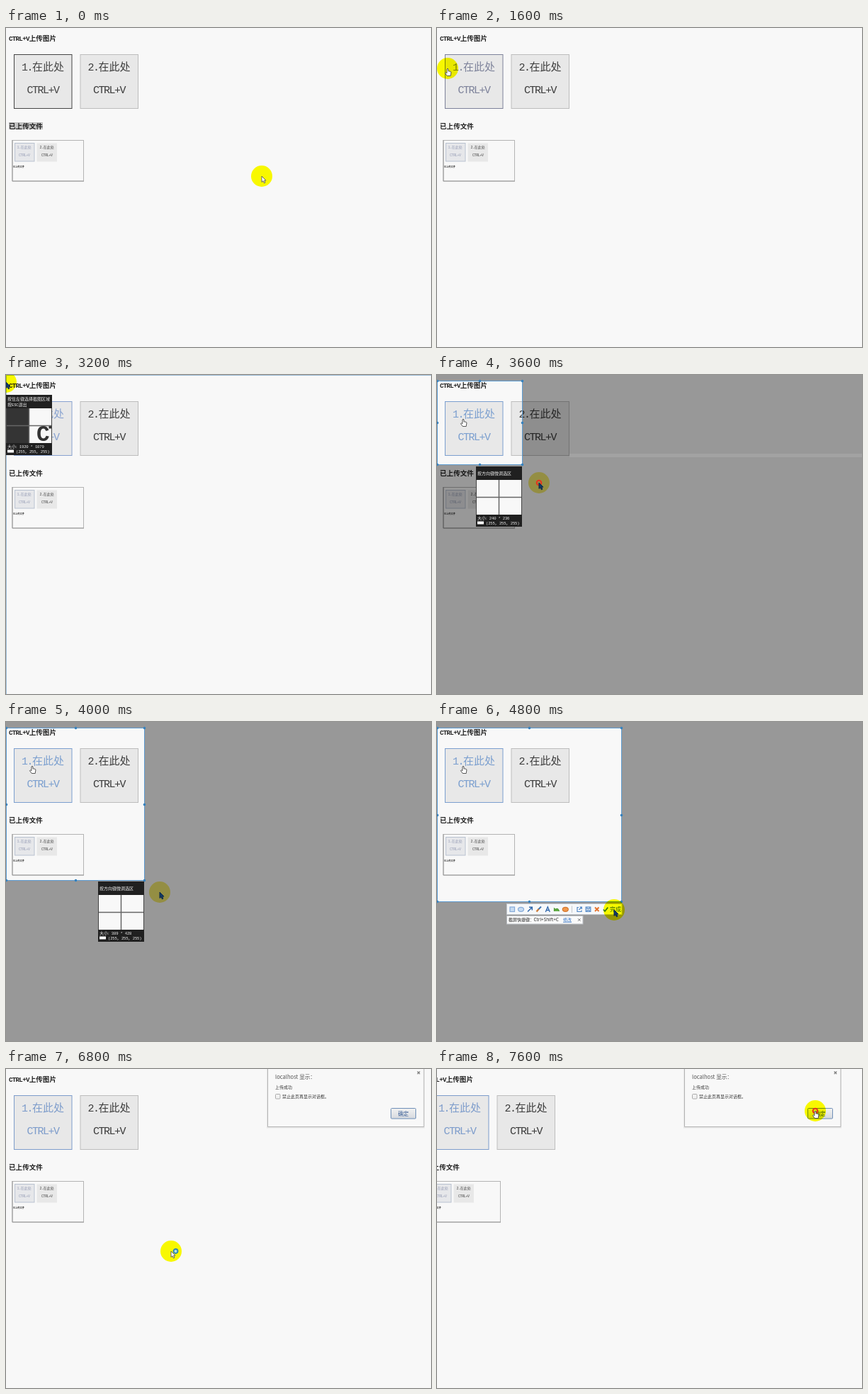
Animation, 600 px wide and 450 px high, one loop 8000 ms. Source, as an HTML page:

```html
<!DOCTYPE html>
<html lang="zh">
<head>
<meta charset="utf-8">
<title>CTRL+V 上传图片</title>
<style>
html, body { margin: 0; width: 100%; height: 100%; overflow: hidden; background: #f8f8f8; }
#stage { position: absolute; left: 0; top: 0; width: 600px; height: 450px; overflow: hidden; background: #f8f8f8; }
#stage > svg { position: absolute; left: 0; top: 0; }
text { font-family: "Noto Sans CJK SC", "Noto Sans CJK", sans-serif; white-space: pre; }
.latin { font-family: "Liberation Mono", monospace; }
.big { font-size: 15px; }
.big .latin, .big.latin { letter-spacing: -1.5px; }
.head { font-size: 9.57px; font-weight: bold; fill: #222; }
.head .latin { font-size: 9.2px; letter-spacing: -.73px; }
.mini { font-size: 5px; }
.mini .latin, .mini.latin { letter-spacing: -.4px; }
.small { font-size: 6px; }
.lens-text { font-size: 6px; fill: #eee; }
.lens-text .latin { font-size: 5.6px; letter-spacing: -.2px; }

/* Everything changes in hard steps; 5% is 400 ms. */
.step { animation: 8s step-end infinite; }
.pan { animation-name: pan; }
.marked { animation-name: marked; }
.box1 { animation-name: ink; }
.box1 rect { stroke: currentColor; }
.box1 text { fill: currentColor; }
.capture { animation-name: capture; }
.pick { animation-name: pick; }
.edge { animation-name: edge; }
.drag { animation-name: drag; }
.drag1 { animation-name: drag1; }
.drag2 { animation-name: drag2; }
.lens { animation-name: lens, lens-move; }
.tools { animation-name: tools; }
.dialog { animation-name: dialog; }
.pointer { animation-name: move; }
.plain { animation-name: plain; }
.hand { animation-name: hand; }
.navy { animation-name: navy; }
.busy { animation-name: busy; }
.click { animation-name: click; }

@keyframes pan { 0% { transform: none } 95%, 100% { transform: translateX(-20px) } }
@keyframes marked { 0% { opacity: 1 } 15%, 100% { opacity: 0 } }
@keyframes ink {
  0% { color: #454545 } 20% { color: #7d829a } 25% { color: #8a9cc4 } 40% { color: #88a2d0 }
  45% { color: #7b9fcf } 65% { color: #627388 } 70% { color: #6d83a8 } 75%, 100% { color: #7d9ccb }
}
@keyframes capture { 0%, 65% { opacity: 0 } 35% { opacity: 1 } }
@keyframes pick { 0%, 45% { opacity: 0 } 35% { opacity: 1 } }
@keyframes edge { 0%, 45% { opacity: 0 } 40% { opacity: 1 } }
@keyframes drag { 0%, 55% { opacity: 0 } 45% { opacity: 1 } }
@keyframes drag1 { 0%, 50% { opacity: 0 } 45% { opacity: 1 } }
@keyframes drag2 { 0%, 55% { opacity: 0 } 50% { opacity: 1 } }
@keyframes lens { 0%, 55% { opacity: 0 } 35% { opacity: 1 } }
@keyframes lens-move {
  0% { transform: translate(104px, 94px) } 40% { transform: translate(0, 28px) }
  45% { transform: translate(55px, 129px) } 50%, 100% { transform: translate(130px, 225px) }
}
@keyframes tools { 0%, 65% { opacity: 0 } 55% { opacity: 1 } }
@keyframes dialog { 0% { opacity: 0 } 85%, 100% { opacity: 1 } }
@keyframes move {
  0% { transform: translate(361px, 209px) } 10% { transform: translate(354px, 206px) }
  15% { transform: translate(157px, 125px) } 20% { transform: translate(15px, 57px) }
  25% { transform: translate(37px, 62px) } 35% { transform: translate(104px, 76px) }
  40% { transform: translate(0, 10px) } 45% { transform: translate(144px, 152px) }
  50% { transform: translate(217px, 240px) } 55% { transform: translate(262px, 255px) }
  60% { transform: translate(250px, 265px) } 65% { transform: translate(165.5px, 198px) }
  70% { transform: translate(233px, 257px) } 90% { transform: translate(554px, 60px) }
  95%, 100% { transform: translate(534px, 59px) }
}
@keyframes glow { 0%, 60% { background: #ff0 } 45% { background: #f8ee70 } }
@keyframes plain { 0%, 65% { opacity: 1 } 20%, 90%, 100% { opacity: 0 } }
@keyframes hand { 0%, 35% { opacity: 0 } 20%, 90%, 100% { opacity: 1 } }
@keyframes navy { 0%, 65% { opacity: 0 } 35% { opacity: 1 } }
@keyframes busy { 0%, 90% { opacity: 0 } 65% { opacity: 1 } }
@keyframes click { 0%, 50% { opacity: 0 } 45%, 95%, 100% { opacity: 1 } }

#area {
  position: absolute; left: 0; top: 8px; box-sizing: border-box; border: 1px solid #5c9bd1;
  box-shadow: 0 0 0 999px rgba(0, 0, 0, .387); animation-name: area;
}
#area::before {
  --d: radial-gradient(circle, #3a83bd 1.7px, transparent 2.1px);
  content: ""; position: absolute; inset: -3px;
  background: var(--d) 0 0, var(--d) 50% 0, var(--d) 100% 0, var(--d) 0 50%,
    var(--d) 100% 50%, var(--d) 0 100%, var(--d) 50% 100%, var(--d) 100% 100%;
  background-size: 5px 5px; background-repeat: no-repeat;
}
@keyframes area {
  0%, 65% { opacity: 0; width: 121px; height: 119px }
  45% { opacity: 1; width: 121px; height: 119px }
  50% { opacity: 1; width: 196px; height: 216px }
  55% { opacity: 1; width: 261px; height: 246px }
}
#halo {
  position: absolute; left: -15px; top: -15px; width: 30px; height: 30px; border-radius: 50%;
  background: #ff0; mix-blend-mode: multiply; animation-name: move, glow;
}
</style>
</head>
<body>
<div id="stage">
  <svg width="600" height="450">
    <defs>
      <path id="arrow" d="M0 0V8.4L2 6.7 3.4 9.8 4.9 9.1 3.5 6.1H6Z"/>
      <path id="finger" d="M-1 1Q0-.8 1 1V3.8L4 4.3Q5 4.6 4.9 6L4.2 10.5H-.7L-3.6 6.6Q-3.3 5-1 6.6Z"
        fill="#fff" stroke="#444" stroke-width=".9"/>
      <linearGradient id="face" x2="0" y2="1">
        <stop stop-color="#f2f2f2"/><stop offset="1" stop-color="#d6d9de"/>
      </linearGradient>
    </defs>
    <g class="step pan">
      <text class="head" x="4" y="18.4"><tspan class="latin">CTRL+V</tspan>上传图片</text>
      <g class="step box1">
        <rect x="11.5" y="37.5" width="81.5" height="76" fill="#e8e8e8"/>
        <text class="big" x="22" y="59.5"><tspan class="latin">1.</tspan>在此处</text>
        <text class="big latin" x="29.5" y="92">CTRL+V</text>
      </g>
      <g fill="#3c3c3c">
        <rect x="105" y="37.5" width="81.5" height="76" fill="#e8e8e8" stroke="#bdbdbd"/>
        <text class="big" x="115.5" y="59.5"><tspan class="latin">2.</tspan>在此处</text>
        <text class="big latin" x="123" y="92">CTRL+V</text>
      </g>
      <rect class="step marked" x="4" y="133" width="48" height="10" fill="#c1c1c1"/>
      <text class="head" x="4" y="141.7">已上传文件</text>

      <rect x="9" y="158.5" width="100.5" height="57.5" fill="#f8f8f8" stroke="#b4b4b4"/>
      <path d="M9 158V216H110" fill="none" stroke="#999"/>
      <rect x="12.5" y="162.5" width="27.500" height="25.5" fill="#e6e7ea" stroke="#b9c2d0"/>
      <rect x="43.500" y="162.500" width="28.500" height="26" fill="#e8e8e8"/>
      <g fill="#969db5">
        <text class="mini" x="15.5" y="170"><tspan class="latin">1.</tspan>在此处</text>
        <text class="mini latin" x="18" y="181">CTRL+V</text>
      </g>
      <g fill="#484848">
        <text class="mini" x="47.5" y="170"><tspan class="latin">2.</tspan>在此处</text>
        <text class="mini latin" x="50" y="181">CTRL+V</text>
      </g>
      <text x="10" y="197.3" font-size="3.2" font-weight="bold" fill="#333">已上传文件</text>

      <g class="step dialog">
        <rect x="368" y="0" width="223" height="83.500" fill="#e6e6e6"/>
        <path d="M369.5 -1V81.5H590V-1" fill="#f8f8f8" stroke="#b5b5b5"/>
        <text x="380" y="14" font-size="7.6" fill="#555">localhost 显示：</text>
        <text class="small" x="380" y="28.200" fill="#333">上传成功</text>
        <rect x="380.500" y="35.500" width="6.500" height="6.500" rx="1" fill="#f2f2f2" stroke="#aaa"/>
        <text class="small" x="390" y="41.200" fill="#333">禁止此页再显示对话框。</text>
        <path d="M580.700 3.500l3.600 3.600m0-3.600l-3.600 3.600" stroke="#777" stroke-width="1.200"/>
        <rect x="543.500" y="55.500" width="35" height="14.500" rx="1" fill="url(#face)" stroke="#6f8fb8"/>
        <text x="553.500" y="65.500" font-size="7.500" fill="#3b5f96">确定</text>
      </g>
    </g>
    <use class="step capture" href="#finger" transform="translate(37 62)" x="37" y="62" style="transform:none"/>
    <path class="step pick" d="M.5 450V.5H600" fill="none" stroke="#9dbdd8"/>
  </svg>

  <div id="area" class="step"></div>

  <svg width="600" height="450">
    <rect class="step drag1" x="187" y="111" width="413" height="5" fill="#a2a2a2"/>

    <g class="step lens">
      <rect width="65" height="85" fill="#202020"/>
      <rect x="0" y="19" width="65" height="49" fill="#f8f8f8"/>
      <svg class="step edge" y="19" width="65" height="49">
        <rect width="32" height="49" fill="#343434"/>
        <text x="43" y="46" font-size="31" font-weight="bold" fill="#333"
          style="font-family:'Liberation Mono',monospace;letter-spacing:-2px">CT</text>
      </svg>
      <path d="M32.500 19V68M0 43.500H65" stroke="#666" stroke-width="1.500"/>
      <path d="M.5 19V68M64.500 19V68" stroke="#444"/>
      <g class="step pick lens-text">
        <text class="lens-text" x="2" y="8.200">按住左键选择截图区域</text>
        <text class="lens-text" x="2" y="16.200">按<tspan class="latin">ESC</tspan>退出</text>
        <text class="lens-text" x="2" y="75.200">大小:<tspan class="latin"> 1920 * 1079</tspan></text>
      </g>
      <text class="step drag lens-text" x="2" y="11.700">按方向键微调选区</text>
      <text class="step drag1 lens-text" x="2" y="75.200">大小:<tspan class="latin"> 240 * 236</tspan></text>
      <text class="step drag2 lens-text" x="2" y="75.200">大小:<tspan class="latin"> 389 * 428</tspan></text>
      <rect x="2" y="77.500" width="9" height="4" fill="#fff"/>
      <text class="lens-text" x="14" y="82"><tspan class="latin">(255, 255, 255)</tspan></text>
    </g>

    <g class="step tools">
      <rect x="98.500" y="256.500" width="162.500" height="15" fill="#f6f8fa" stroke="#c3c8ce"/>
      <g fill="none" stroke="#4f86c6" stroke-width="1.200">
        <rect x="103" y="261" width="6.500" height="6.500" fill="#c7dcf2" stroke="#86abd9"/>
        <ellipse cx="118.500" cy="264.300" rx="4" ry="3" fill="#c7dcf2" stroke="#86abd9"/>
        <path d="M128 267.500L134 261.500M130 261.200H134.300V265.500" stroke="#2f66ab" stroke-width="1.500"/>
        <path d="M143 264.500L147 260.500" stroke="#3f74b0" stroke-width="2"/>
        <path d="M140.500 267.500L143.500 264" stroke="#cc7b3a" stroke-width="2.400"/>
        <path d="M153.300 268L156.300 260.800 159.300 268M154.500 265.500H158.200" stroke="#2f66ab" stroke-width="1.300"/>
        <path d="M165.500 267V263l2 1.500q3-3 5 2.500" fill="#62ae45" stroke="#4c9a35"/>
        <ellipse cx="181.300" cy="264.300" rx="4" ry="3" fill="#f09a4f" stroke="#d5762c"/>
        <path d="M190.500 259.500V269" stroke="#c5c9ce" stroke-width="1"/>
        <path d="M200 261.500H198V267.500H204V265.500M200.500 265L204 261.200M201.500 261H204.300V264"/>
        <path d="M210.200 261H216.800V267.500H210.200ZM212 261V263.500H215V261M212 267V265.500H215V267"/>
        <path d="M223 261.500L228.500 267M228.500 261.500L223 267" stroke="#e5722c" stroke-width="1.900"/>
        <path d="M234.800 264.500L237 267 241.300 261.500" stroke="#2f78bd" stroke-width="1.700"/>
      </g>
      <text x="244" y="267.300" font-size="8" fill="#2f5f9e">完成</text>
      <rect x="98.500" y="273.500" width="107.500" height="11.500" fill="#fafafa" stroke="#b9bdc2"/>
      <text class="small" x="101" y="281.400" fill="#222">截屏快捷键：</text>
      <text x="136.500" y="281.400" font-size="6.400" fill="#222" style="font-family:'Open Sans',sans-serif">Ctrl+Shift+C</text>
      <text class="small" x="178" y="281.400" fill="#2a6cc0" text-decoration="underline">修改</text>
      <path d="M199 277.300l3.500 3.500m0-3.500l-3.500 3.500" stroke="#666" stroke-width=".9"/>
    </g>
  </svg>

  <div id="halo" class="step"></div>

  <svg width="600" height="450">
    <g class="step pointer">
      <circle class="step click" r="3.300" fill="none" stroke="#e8321e" stroke-width="2"/>
      <use class="step plain" href="#arrow" fill="#fff" stroke="#555" stroke-width=".9"/>
      <use class="step hand" href="#finger"/>
      <use class="step navy" href="#arrow" fill="#123a66" stroke="#0d2748" stroke-width="1"/>
      <circle class="step busy" cx="6.500" r="3" fill="#b5dfe8" stroke="#2b86b0" stroke-width="1.900"/>
    </g>
  </svg>
</div>
</body>
</html>
```
